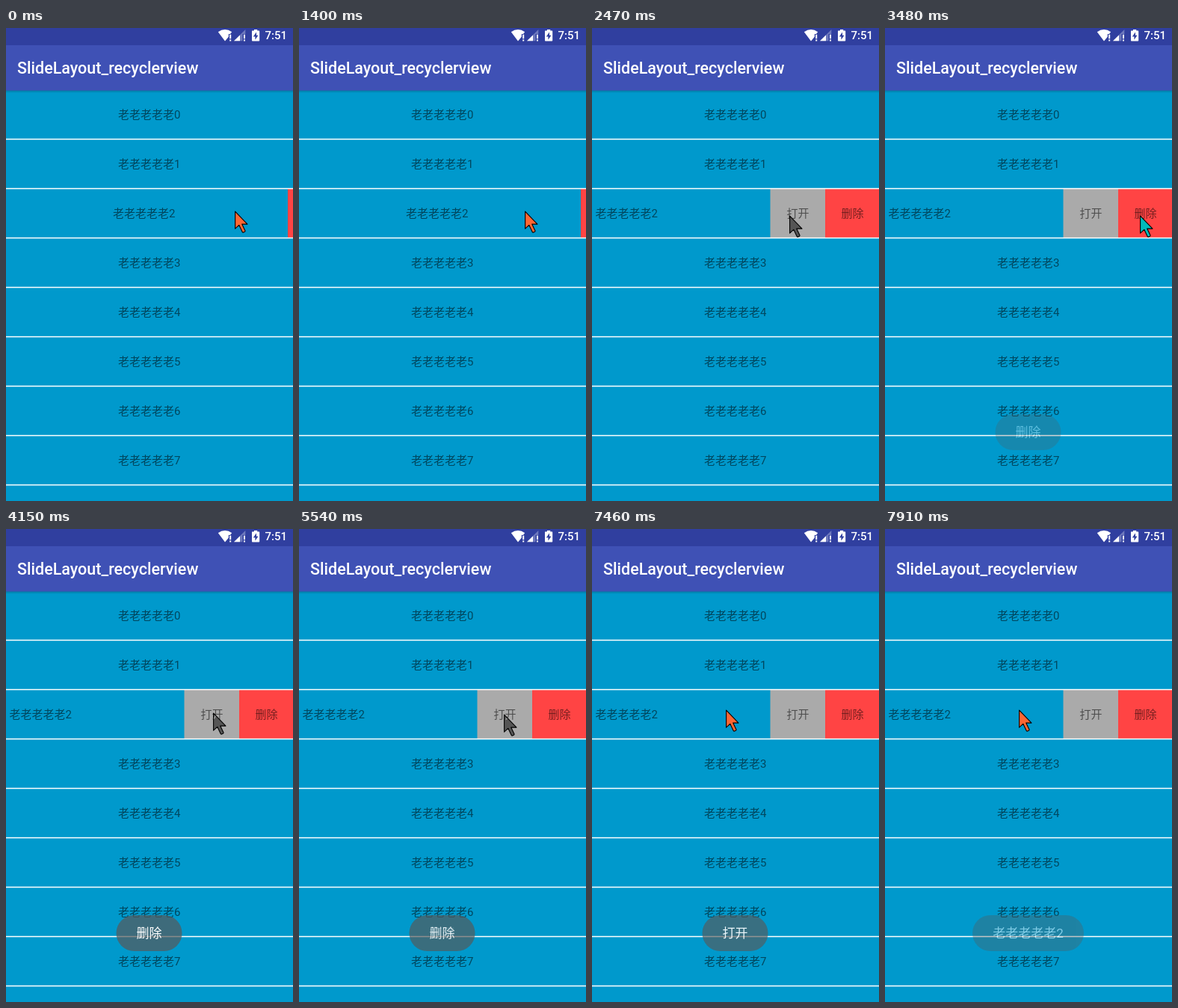
Animation of 384 by 632 pixels, one loop 8 s. Source, as an HTML page:

```html
<!DOCTYPE html>
<html lang="zh-CN">
<head>
<meta charset="utf-8">
<title>Slide list</title>
<style>
  html, body { margin: 0; width: 100%; height: 100%; overflow: hidden; background: #fff; }
  svg { display: block; width: 384px; height: 632px; }
  text { font-family: Roboto, "Noto Sans CJK SC", "Noto Sans CJK", sans-serif; }
  .label { font-size: 15px; fill: #000; fill-opacity: .54; text-anchor: middle; }
  .toast text { font-size: 17px; fill: #fff; text-anchor: middle; }
  .bar { font-weight: 500; fill: #fff; }
  #invert { mix-blend-mode: difference; }
</style>
</head>
<body>
<svg id="stage" viewBox="0 0 384 632">
  <defs>
    <linearGradient id="shade" x2="0" y2="1">
      <stop stop-color="#000" stop-opacity=".22"/>
      <stop offset="1" stop-color="#000" stop-opacity="0"/>
    </linearGradient>
  </defs>
  <rect width="384" height="632" fill="#fff"/>
  <g id="list"></g>

  <rect y="83" width="384" height="4" fill="url(#shade)"/>
  <rect width="384" height="83.5" fill="#3f51b5"/>
  <rect width="384" height="23" fill="#303f9f"/>
  <text class="bar" x="15" y="61.3" font-size="21.5">SlideLayout_recyclerview</text>
  <text class="bar" x="346.5" y="15.4" font-size="15">7:51</text>

  <g fill="#fff">
    <path d="M283.8 5.2Q293 -1 302.2 5.2L300 8H297.8V11.8L293 17.6Z"/>
    <path d="M299.2 8.8h2v5.4h-2zM299.2 15.4h2v2h-2z"/>
    <path d="M320.3 2V8H316.6V17.3H305Z" opacity=".3"/>
    <path d="M313 9.4V17.3H305Z"/>
    <path d="M318 8.8h2v5.4h-2zM318 15.4h2v2h-2z"/>
    <path d="M332 2h4.2v1.6h2.2q.8 0 .8.8v12.3q0 .8-.8.8h-8.6q-.8 0-.8-.8v-12.3q0-.8.8-.8h2.2z"/>
    <path d="M335 5.6L330.8 11.6H333.4V15.8L337.5 9.7H335Z" fill="#303f9f"/>
  </g>

  <g id="toasts"></g>
  <path id="invert" fill="#fff"/>
  <path id="outline" fill="none" stroke="#000" stroke-width="1.1" stroke-linejoin="round"/>
</svg>
<script>
const LOOP = 8000, ROW = 66, TOP = 83, SLIDING = 2;
const ARROW = "M.6 1.2V24.2L5.8 19.3L10.2 28.4Q10.7 29.4 11.7 29L13.4 28.2Q14.3 27.7 13.9 26.8L9.7 18.1H17Z";
const $ = id => document.getElementById(id);

function add(parent, tag, attrs, text) {
  const el = document.createElementNS("http://www.w3.org/2000/svg", tag);
  for (const k in attrs) el.setAttribute(k, attrs[k]);
  if (text) el.textContent = text;
  parent.appendChild(el);
  return el;
}
const label = (parent, x, y, text) => add(parent, "text", { class: "label", x, y }, text);
const name = i => "老老老老老" + i;

// list rows; the sliding one covers a fixed menu
let slider;
for (let i = 0; i < 9; i++) {
  const y = TOP + i * ROW, row = add($("list"), "g", {});
  if (i === SLIDING) {
    add(row, "rect", { x: 238, y, width: 74, height: ROW, fill: "#aaa" });
    add(row, "rect", { x: 312, y, width: 72, height: ROW, fill: "#f44" });
    label(row, 275.6, y + 38, "打开");
    label(row, 348.5, y + 38, "删除");
  }
  const face = add(row, "g", {});
  add(face, "rect", { y, width: 384, height: ROW, fill: "#09c" });
  label(face, 191.7, y + 38, name(i));
  if (i === SLIDING) slider = face;
}
for (let i = 1; i < 9; i++)
  add($("list"), "rect", { y: TOP + i * ROW - 1.2, width: 384, height: 1.5, fill: "#fff" });

// toasts: start of fade in, start of fade out
const toasts = [
  { text: "删除", w: 88, from: 3380, to: 5500 },
  { text: "打开", w: 88, from: 5500, to: 7430 },
  { text: name(SLIDING), w: 149, from: 7765, to: 9900 }
];
for (const t of toasts) {
  t.el = add($("toasts"), "g", { class: "toast" });
  add(t.el, "rect", { x: 191.5 - t.w / 2, y: 516, width: t.w, height: 48, rx: 24, fill: "#595959", "fill-opacity": .7 });
  add(t.el, "text", { x: 191.6, y: 546.4 }, t.text);
}

const pointer = [
  [0, 306, 244], [850, 316, 244], [980, 324, 244], [1130, 315, 244], [1250, 306, 244],
  [1400, 302, 244], [1520, 299, 244], [1640, 294, 244], [2040, 225, 244], [2190, 297, 242],
  [2320, 287, 241], [2470, 264, 250], [2620, 260, 250], [2770, 264, 250], [2920, 310, 250],
  [3040, 341, 250], [3600, 338, 250], [3720, 321, 250], [3870, 305, 248], [4000, 293, 247],
  [4150, 277, 245], [4300, 274, 245], [5540, 274, 247], [5680, 274, 245], [5800, 271, 244],
  [5920, 264, 243], [6070, 225, 242], [6190, 193, 242], [6340, 179, 241]
];
// time, distance the row is pulled left
const pull = [
  [0, 7], [400, 4], [550, .4], [700, 0], [1400, 7], [1520, 10], [1640, 14.5],
  [2040, 84], [2190, 143], [2320, 145], [2470, 145.5]
];
const fadeTicks = [3480, 3600, 3720, 3870, 4000, 5540, 5680, 5800, 5920, 7460, 7610, 7760, 7910].map(t => [t]);

function at(steps, time) {
  let hit = steps[0];
  for (const s of steps) if (s[0] <= time) hit = s;
  return hit;
}
const clamp = v => Math.max(0, Math.min(1, v));

function draw(time) {
  const [, x, y] = at(pointer, time);
  for (const id of ["invert", "outline"]) $(id).setAttribute("transform", `translate(${x} ${y})`);
  slider.setAttribute("transform", `translate(${-at(pull, time)[1]} 0)`);
  const tick = at(fadeTicks, time)[0];
  for (const t of toasts) {
    const rise = 1 - (1 - clamp((tick - t.from) / 500)) ** 2;
    const fall = 1 - clamp((tick - t.to) / 400);
    t.el.setAttribute("opacity", time < fadeTicks[0][0] ? 0 : rise * fall);
  }
}

$("invert").setAttribute("d", ARROW);
$("outline").setAttribute("d", ARROW);
const start = performance.now();
function frame() {
  draw((performance.now() - start) % LOOP);
  requestAnimationFrame(frame);
}
frame();
</script>
</body>
</html>
```
